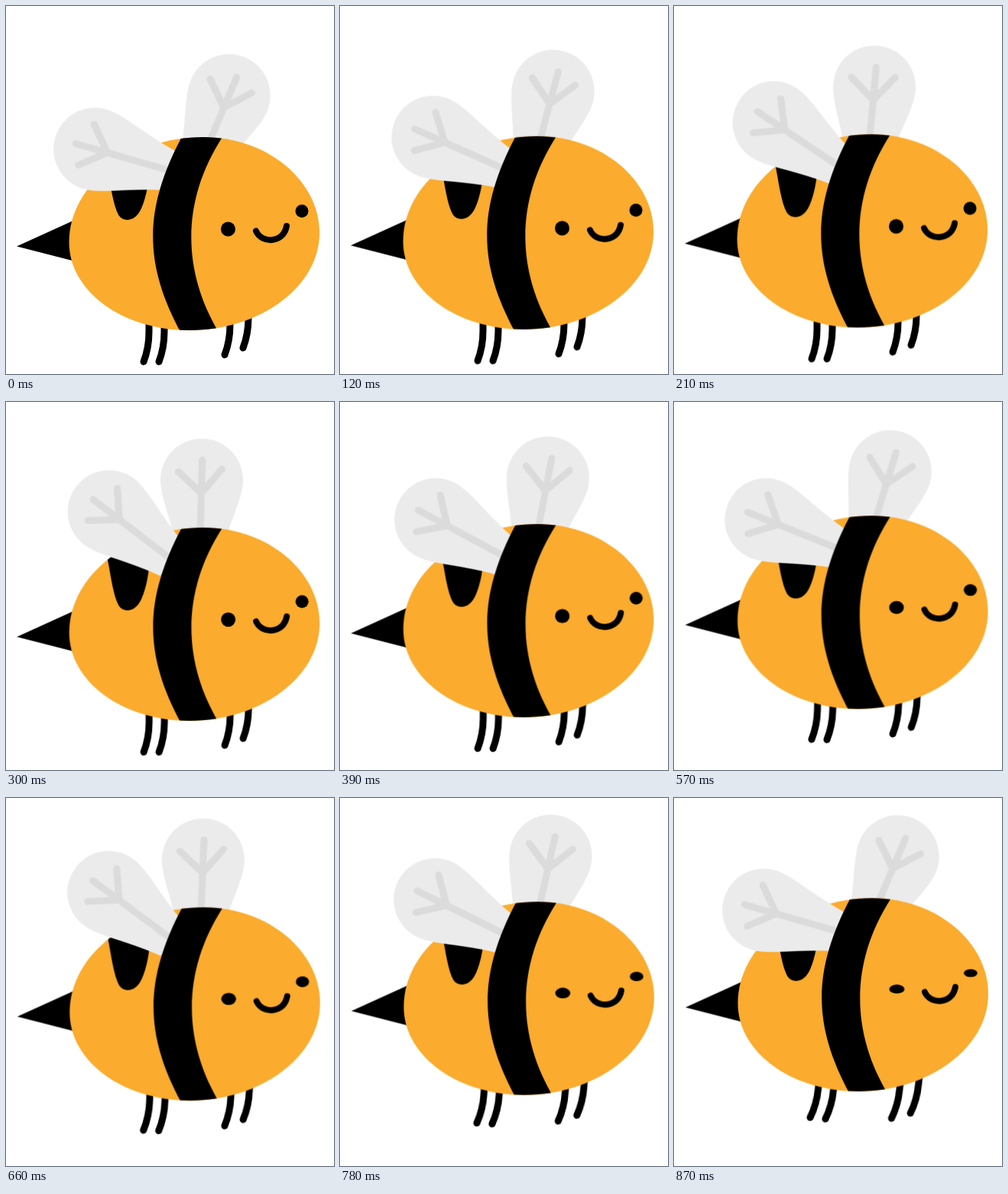
Recreate the animation shown at these times as an HTML page without scripts. Size 429 px wide and 480 px high, loop 900 ms.

```html
<!DOCTYPE html>
<html lang="en">
<head>
<meta charset="utf-8">
<title>Flying bee</title>
<style>
  html, body { margin: 0; width: 100%; height: 100%; overflow: hidden; background: #fff; }
  svg { display: block; width: 100%; height: 100%; }

  .bee, .legs, .wing, .eye { animation: 900ms linear infinite; }
  .bee { animation-name: rise; }
  .legs { animation-name: swing; animation-timing-function: cubic-bezier(.5, 0, .75, 0); transform-origin: 250px 430px; }
  .eye { animation-name: squint; animation-timing-function: cubic-bezier(.333, 0, .667, 0); }
  .near { transform-origin: 290.5px 287.5px; }
  .far { transform-origin: 387px 271px; }
  .wing { animation-name: flap; animation-timing-function: cubic-bezier(.364, 0, .636, 1); }
  .back { --down: 23deg; --up: 1.5deg; transform-origin: 253px 208px; }
  .front { --down: -74deg; --up: -52.5deg; transform-origin: 222px 217px; }

  /* First three quarters of a sine half-wave */
  @keyframes rise {
    0% { transform: translate(0, 0); animation-timing-function: cubic-bezier(.364, 0, .682, .5); }
    66.667% { transform: translate(.6px, -24.5px); animation-timing-function: cubic-bezier(.333, .37, .667, .738); }
    100% { transform: translate(1px, -41.8px); }
  }
  @keyframes swing { to { transform: rotate(6.2deg); } }
  @keyframes squint { to { transform: scale(1.05, .58); } }
  @keyframes flap {
    0%, 56.7%, 97%, 100% { transform: rotate(var(--down)); }
    32.2%, 76% { transform: rotate(var(--up)); }
  }
</style>
</head>
<body>
<svg viewBox="0 0 429 480">
  <defs>
    <path id="body" d="M82.5 308C82.5 232 164 171 258 171C342 171 410 228 410 296C410 366 332 423 240 423C152 423 82.5 372 82.5 308Z"/>
    <clipPath id="inside"><use href="#body"/></clipPath>
    <g id="wing">
      <path fill="#ebebeb" d="M-54 0A54 54 0 0 1 54 0C54 24 38 52 26 104H-26C-38 52 -54 24 -54 0Z"/>
      <path fill="none" stroke="#dbdbdb" stroke-width="9" stroke-linecap="round" stroke-linejoin="round" d="M0 -26V100M-31 -10L0 17L26 -15"/>
    </g>
    <path id="leg" d="M187 400V425Q187 446 180 464"/>
  </defs>

  <g class="bee">
    <path d="M14 313.5L100 274.5V335.6Z"/>
    <g class="legs" fill="none" stroke="#000" stroke-width="9" stroke-linecap="round">
      <use href="#leg"/>
      <use href="#leg" x="20"/>
      <use href="#leg" x="106" y="-9"/>
      <use href="#leg" x="130" y="-18"/>
    </g>
    <g class="wing back"><use href="#wing" transform="translate(253 109)"/></g>
    <use href="#body" fill="#fbab2d"/>
    <path clip-path="url(#inside)" d="M130 200C136 225 138 250 145 268Q149 279 158 279Q170 279 177 264C184 248 187 230 189 200Z"/>
    <g class="wing front"><use href="#wing" transform="translate(222 107) scale(-1 1)"/></g>
    <path clip-path="url(#inside)" d="M233 165C180 262 178 335 231 430H281C228 345 229 250 287 165Z"/>
    <circle class="eye near" cx="290.5" cy="291" r="9.5"/>
    <circle class="eye far" cx="387" cy="267.5" r="8.5"/>
    <path fill="none" stroke="#000" stroke-width="8" stroke-linecap="round" d="M327 293.5C334 310 363 310 367 287"/>
  </g>
</svg>
</body>
</html>
```
